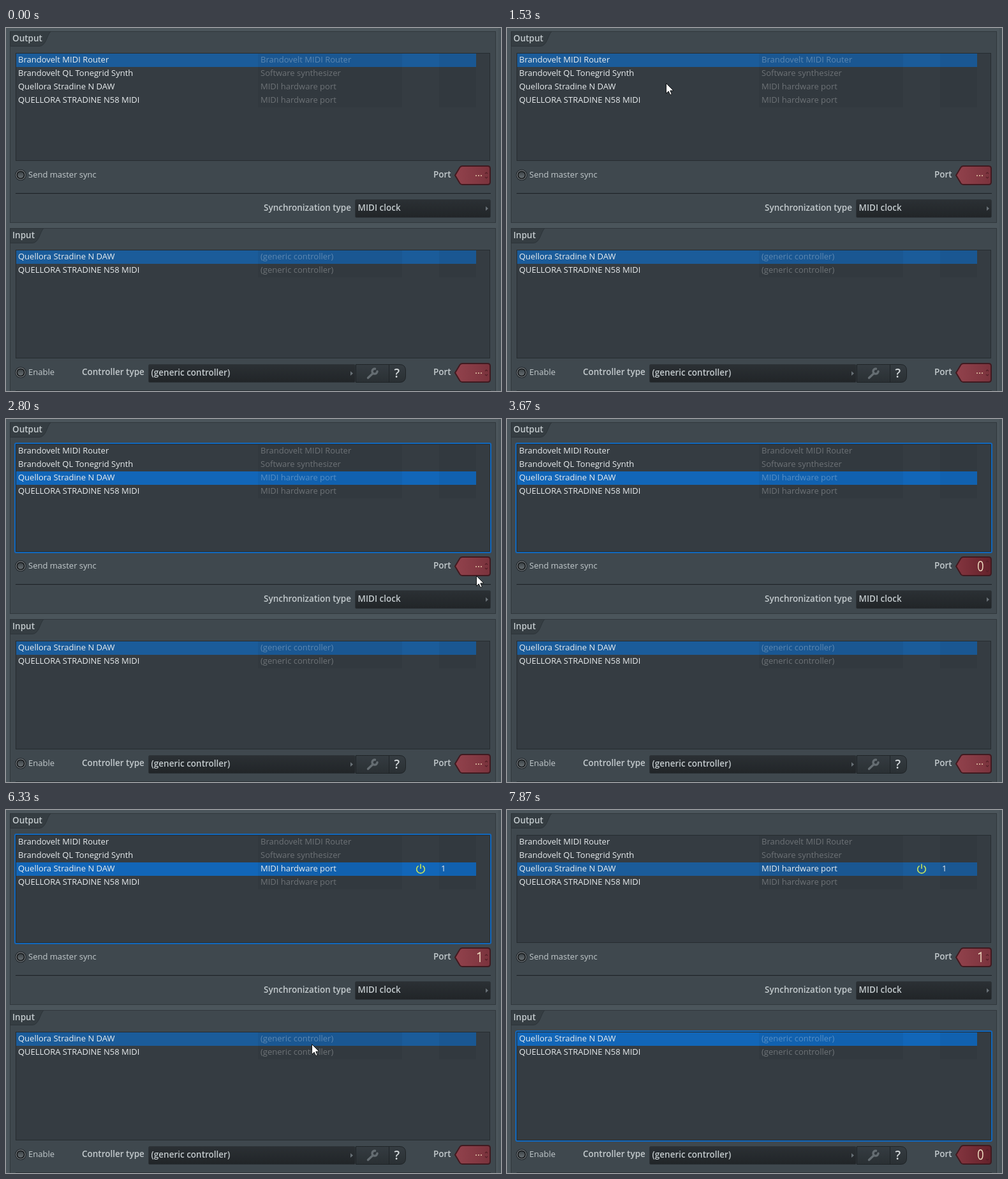
An HTML page for the animation above (8 s loop, 776 by 568 pixels).

```html
<!DOCTYPE html>
<html lang="en">
<head>
<meta charset="utf-8">
<title>MIDI settings</title>
<style>
html, body { margin: 0; width: 100%; height: 100%; overflow: hidden; background: #4b555b; }
svg { display: block; width: 776px; height: 568px; }
text { font: 13px "Open Sans", "Noto Sans", sans-serif; fill: #e9edef; white-space: pre; }
.label { fill: #c3cacd; }
.strong { font-size: 13.5px; font-weight: 600; fill: #c3cacd; }
.dim { fill: #fff; fill-opacity: .29; }
.help { font-size: 19px; font-weight: 600; fill: #d3d8da; }
</style>
</head>
<body>
<svg id="stage" viewBox="0 0 776 568" xmlns="http://www.w3.org/2000/svg"></svg>
<script>
const LOOP = 8000, FPS = 15;
const ROW = 21;
const outputs = [
  ["Brandovelt MIDI Router", "Brandovelt MIDI Router"],
  ["Brandovelt QL Tonegrid Synth", "Software synthesizer"],
  ["Quellora Stradine N DAW", "MIDI hardware port"],
  ["QUELLORA STRADINE N58 MIDI", "MIDI hardware port"]
];
const inputs = outputs.slice(2).map(([name]) => [name, "(generic controller)"]);

const rect = (x, y, w, h, fill, more = "") =>
  `<rect x="${x}" y="${y}" width="${w}" height="${h}" fill="${fill}" ${more}/>`;
const path = (d, more = "") => `<path d="${d}" ${more}/>`;
const text = (x, y, s, cls = "", more = "") =>
  `<text x="${x}" y="${y}" class="${cls}" ${more}>${s}</text>`;
const gradient = (id, from, to, x2, y2) =>
  `<linearGradient id="${id}" x2="${x2}" y2="${y2}"><stop stop-color="${from}"/><stop offset="1" stop-color="${to}"/></linearGradient>`;

function panel(y, h, title, tabWidth) {
  const right = 6 + tabWidth;
  return rect(6.5, y + .5, 761, h, "#3f484e", 'stroke="#30373c"') +
    path(`M6.5 ${y + .5}H${right}C${right - 6} ${y + 6} ${right - 7} ${y + 23.5} ${right - 18} ${y + 23.5}H6.5Z`,
      'fill="#353d42" stroke="#2d3439"') +
    text(10, y + 16, title, "strong");
}

function list(id, y, h, rows) {
  const rowsH = rows.length * ROW;
  const names = rows.map(([name, kind], i) => {
    const base = y + 15 + i * ROW;
    return text(19, base, name) + text(399, base, kind, "dim", `id="${id}Kind${i}"`);
  }).join("");
  return rect(15.5, y + .5, 743, h, "#353c42", 'stroke="#262c30"') +
    rect(16, y + 1, 721, ROW, "#1b5c9a", `id="${id}Row"`) +
    rect(395, y + 1, 226, rowsH, "#000", 'opacity=".05"') +
    rect(679, y + 1, 58, rowsH, "#000", 'opacity=".05"') + names +
    rect(14, y - 1, 746, h + 3, "none", `id="${id}Ring" rx="2" stroke="#1268bd" stroke-width="2" opacity="0"`);
}

const radio = y =>
  `<circle cx="23" cy="${y}" r="8.8" fill="#23282c"/>` +
  `<circle cx="23" cy="${y}" r="7.6" fill="#888e92"/>` +
  `<circle cx="23" cy="${y}" r="6.6" fill="#15181a"/>` +
  `<circle cx="23" cy="${y}" r="4.8" fill="url(#knob)"/>`;

const separator = y => rect(15, y, 745, 2, "#2a3035") + rect(15, y + 2, 745, 1, "#475056");

const dropdown = (x, y, w, label) =>
  rect(x + .5, y + .5, w - 1, 28, "url(#well)", 'rx="2" stroke="#2e3439"') +
  text(x + 4.5, y + 18, label, "strong") +
  path(`M${x + w - 8} ${y + 11}l4 3.5l-4 3.5z`, 'fill="#697177"');

const port = (id, y) => text(670, y + 19, "Port", "strong") + `<g transform="translate(0 ${y})">` +
  path("M704 15.5L711.5 3Q713 1 715.5 1H755Q759 1 759 5V26Q759 30 755 30H715.5Q713 30 711.5 28Z",
    `id="${id}Body" stroke="#401a20" stroke-width="2"`) +
  path("", `id="${id}Arrows" fill="none" stroke="#551f27" stroke-width="1.2"`) +
  path("M736 15h2v2h-2zM740 15h2v2h-2zM744 15h2v2h-2z", `id="${id}Dots" fill="#cda68f"`) +
  path("", `id="${id}Digit" fill="none" stroke="#efdcc0" stroke-width="1.5"`) + "</g>";

const stage = document.getElementById("stage");
stage.innerHTML = `<defs>
  ${gradient("well", "#2b3034", "#212528", 0, 1)}
  ${gradient("button", "#353c41", "#2a3034", 0, 1)}
  ${gradient("knob", "#3c4347", "#676e72", 0, 1)}
  ${gradient("idle", "#92424c", "#7a333d", 1, 0)}
  ${gradient("pressed", "#84353f", "#64222b", 1, 0)}</defs>` +
  rect(0, 0, 776, 568, "#4b555b") + rect(772, 0, 4, 568, "#465056") +
  panel(5, 299, "Output", 64) + list("out", 39, 168, outputs) +
  `<g id="active">` +
    path("M646.6 87.3a6.3 6.3 0 1 0 6.8 0M650 84.5V92", 'fill="none" stroke="#c5e45c" stroke-width="1.6"') +
    text(682, 96, "1") + "</g>" +
  radio(230) + text(35, 234, "Send master sync", "label") + port("p1", 215) +
  separator(258) + text(404, 286, "Synchronization type", "strong") + dropdown(547, 268, 213, "MIDI clock") +
  panel(313, 270, "Input", 53) + list("in", 347, 169, inputs) +
  radio(539) + text(35, 543, "Enable", "label") +
  text(119, 543, "Controller type", "strong") + dropdown(223, 526, 325, "(generic controller)") +
  path("M548.5 526.5H617Q626.5 526.5 626.5 536V545Q626.5 554.5 617 554.5H548.5Z", 'fill="url(#button)" stroke="#1f2427"') +
  rect(600, 527, 1, 27, "#1f2427") +
  path("M567.5 547.5L575 540.5M578.5 533.2A4 4 0 1 0 582 537.2",
    'fill="none" stroke="#656d72" stroke-width="3.4" stroke-linecap="round"') +
  text(608.5, 547, "?", "help") + port("p2", 524) + separator(567) +
  path("M-.5 .5V16.5L3.2 13L5.8 18.6L8.3 17.6L5.8 12H11Z",
    'id="cursor" fill="#fff" stroke="#111416" stroke-linejoin="round"');

const el = {};
stage.querySelectorAll("[id]").forEach(n => el[n.id] = n);
const set = (id, attrs) => { for (const k in attrs) el[id].setAttribute(k, attrs[k]); };
const show = (id, on) => set(id, { visibility: on ? "visible" : "hidden" });

// Pointer journeys: [step, x, y]
const journeys = [
  [[11, 784, 576], [14, 690, 490], [17, 480, 300], [20, 310, 140], [23, 250, 86],
   [30, 250, 86], [33, 335, 100], [37, 580, 180], [41, 725, 241], [43, 743, 246], [44, 743, 245], [47, 742, 226]],
  [[75, 742, 226], [82, 742, 226], [85, 692, 250], [89, 560, 324], [93, 488, 362], [95, 480, 366],
   [102, 480, 366], [105, 567, 384], [109, 700, 474], [112, 740, 532], [114, 742, 537]]
];

// Monotone cubic through the points, so rests stay still.
function along(points, step, axis) {
  const last = points.length - 2;
  const slope = i => i < 0 || i > last ? 0 :
    (points[i + 1][axis] - points[i][axis]) / (points[i + 1][0] - points[i][0]);
  const tangent = i => {
    const a = slope(i - 1), b = slope(i);
    return a * b > 0 ? 2 * a * b / (a + b) : 0;
  };
  let i = 0;
  while (i < last && step >= points[i + 1][0]) i++;
  const p = points[i], q = points[i + 1], h = q[0] - p[0], u = (step - p[0]) / h;
  const v = 1 - u;
  return v * v * (1 + 2 * u) * p[axis] + u * v * v * h * tangent(i) +
    u * u * (3 - 2 * u) * q[axis] - u * u * v * h * tangent(i + 1);
}

const ramp = (step, from, to) => Math.min(1, Math.max(0, (step - from) / (to - from)));
const mix = (a, b, u) => `rgb(${a.map((v, i) => Math.round(v + (b[i] - v) * u))})`;

function focusList(id, amount) {
  set(id + "Ring", { opacity: amount });
  set(id + "Row", { fill: mix([27, 92, 154], [18, 102, 184], amount) });
}

const digits = { 0: "M742.3 7.8C737.5 7.8 737.5 22.6 742.3 22.6C747.1 22.6 747.1 7.8 742.3 7.8Z", 1: "M739 10.5L743 8V23" };

function drawPort(id, value, pressed, hover) {
  const d = hover ? 8 : 4;
  set(id + "Body", { fill: pressed ? "url(#pressed)" : "url(#idle)" });
  set(id + "Arrows", { d: `M751 ${17 - d}l2 -2l2 2M751 ${14 + d}l2 2l2 -2` });
  show(id + "Dots", value === null);
  set(id + "Digit", { d: value === null ? "" : digits[value] });
}

function draw(t) {
  const step = Math.floor((t + 5) * FPS / 1000);
  const assigned = step >= 75;

  set("outRow", { y: 40 + (step >= 27 ? 2 * ROW : 0) });
  focusList("out", ramp(step, 26, 29) - ramp(step, 96, 100));
  focusList("in", ramp(step, 96, 100));
  show("active", assigned);
  set("outKind2", { class: assigned ? "" : "dim" });

  drawPort("p1", step < 55 ? null : step < 67 ? 0 : 1, step >= 45 && step < 75, step >= 45 && step < 84);
  drawPort("p2", step < 118 ? null : 0, step >= 112, step >= 112);

  const trip = journeys.find(p => step >= p[0][0] && step < p[p.length - 1][0]);
  const visible = trip && step >= 12;
  show("cursor", visible);
  if (visible) {
    const [x, y] = [1, 2].map(axis => Math.round(along(trip, step, axis)));
    set("cursor", { transform: `translate(${x} ${y})` });
  }
}

const start = performance.now();
function tick(now) {
  draw(Math.max(0, now - start) % LOOP);
  requestAnimationFrame(tick);
}
draw(0);
requestAnimationFrame(tick);
</script>
</body>
</html>
```
